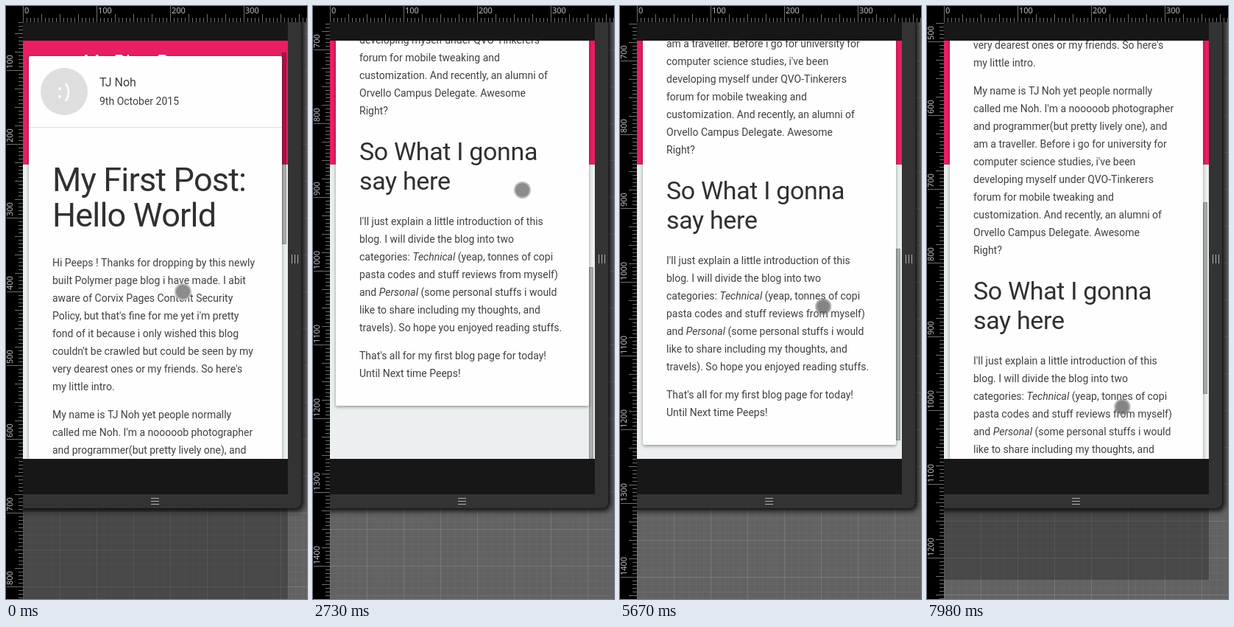
Write an HTML page with a canvas that moves like this. It is 409x804 px and loops after 8000 ms.

```html
<!DOCTYPE html>
<html lang="en">
<head>
<meta charset="utf-8">
<title>Scrolling blog in a device preview</title>
<style>
  html, body { margin: 0; width: 100%; height: 100%; overflow: hidden; background: #000; }
  canvas { display: block; width: 409px; height: 804px; }
</style>
</head>
<body>
<canvas id="stage" width="409" height="804"></canvas>
<script>
const W = 409, H = 804, LOOP = 8000, STEP = 70;
const RULER = 22, LEFT = 23, RIGHT = 383, TOP = 47, BOTTOM = 614;
const MAX_SCROLL = 662, THUMB = 260, GRAB = 3850;
const ctx = document.getElementById('stage').getContext('2d');

// Each gesture eases from wherever the last one ended.
const swipes = [
  { at: -400, dur: 800, to: 165 },
  { at: 1050, dur: 785, to: 420 },
  { at: 1960, dur: 500, to: MAX_SCROLL },
  { at: 3920, dur: 740, to: 514 },
  { at: 4760, dur: 600, to: MAX_SCROLL },
  { at: 5530, dur: 400, to: 474 },
  { at: 6440, dur: 764, to: MAX_SCROLL },
  { at: 7280, dur: 640, to: 473 }
];
const pointerMoves = [
  { at: 0, dur: 840, x: 245, y: 528 },
  { at: 1050, dur: 575, x: 262, y: 360 },
  { at: 1625, dur: 265, x: 248, y: 528 },
  { at: 1960, dur: 640, x: 284, y: 249 },
  { at: 2800, dur: 630, x: 267, y: 440 },
  { at: 3430, dur: 420, x: 276, y: 354 }
];

const smooth = p => p * p * (3 - 2 * p);
const clamp01 = p => Math.min(1, Math.max(0, p));

function follow(gestures, key, start, t) {
  return gestures.reduce(
    (v, g) => v + (g[key] - v) * smooth(clamp01((t - g.at) / g.dur)), start);
}

const scrollAt = t => Math.round(follow(swipes, 'to', -97, t));

function pointerAt(t, scroll) {
  if (t < GRAB) {
    return [follow(pointerMoves, 'x', 240, t), follow(pointerMoves, 'y', 387, t)];
  }
  const pull = MAX_SCROLL - scroll;
  return [280 - pull * 0.08, 354 + pull];
}

function box(x, y, w, h, color) {
  ctx.fillStyle = color;
  ctx.fillRect(x, y, w, h);
}

function disc(x, y, r, color) {
  ctx.fillStyle = color;
  ctx.beginPath();
  ctx.arc(x, y, r, 0, Math.PI * 2);
  ctx.fill();
}

// Text between asterisks is set in italics.
function text(str, x, y, size, color, spacing = 0) {
  ctx.fillStyle = color;
  ctx.letterSpacing = spacing + 'px';
  str.split('*').forEach((run, i) => {
    ctx.font = `${i % 2 ? 'italic ' : ''}${size}px Roboto, sans-serif`;
    ctx.fillText(run, x, y);
    x += ctx.measureText(run).width;
  });
  ctx.letterSpacing = '0px';
}

function heading(rows, y, size, leading, tracking) {
  rows.forEach((row, i) => text(row, 63, y + i * leading, size, '#303030', size * tracking));
}

function paragraph(rows, y) {
  rows.forEach((row, i) => text(row, 63, y + i * 24, 14, '#404040'));
}

const intro = [
  'Hi Peeps ! Thanks for dropping by this newly',
  'built Polymer page blog i have made. I abit',
  'aware of Corvix Pages Content Security',
  "Policy, but that's fine for me yet i'm pretty",
  'fond of it because i only wished this blog',
  "couldn't be crawled but could be seen by my",
  "very dearest ones or my friends. So here's",
  'my little intro.'
];
const about = [
  'My name is TJ Noh yet people normally',
  "called me Noh. I'm a nooooob photographer",
  'and programmer(but pretty lively one), and',
  'am a traveller. Before i go for university for',
  "computer science studies, i've been",
  'developing myself under QVO-Tinkerers',
  'forum for mobile tweaking and',
  'customization. And recently, an alumni of',
  'Orvello Campus Delegate. Awesome',
  'Right?'
];
const plan = [
  "I'll just explain a little introduction of this",
  'blog. I will divide the blog into two',
  'categories: *Technical* (yeap, tonnes of copi',
  'pasta codes and stuff reviews from myself)',
  'and *Personal* (some personal stuffs i would',
  'like to share including my thoughts, and',
  'travels). So hope you enjoyed reading stuffs.'
];
const outro = ["That's all for my first blog page for today!", 'Until Next time Peeps!'];

function drawBackdrop(scroll) {
  box(0, 0, W, H, '#626262');
  const originY = RULER - 1 - scroll;
  for (const [step, alpha] of [[10, 0.035], [50, 0.1]]) {
    const color = `rgba(255,255,255,${alpha})`;
    for (let x = LEFT; x < W; x += step) box(x, RULER, 1, H, color);
    for (let y = originY; y < H; y += step) if (y >= RULER) box(LEFT, y, W, 1, color);
  }
  box(LEFT, RULER, RIGHT - LEFT, Math.max(0, 1251 - scroll - RULER), 'rgba(0,0,0,.27)');
}

function drawDevice() {
  ctx.save();
  ctx.shadowColor = '#000';
  ctx.shadowBlur = 8;
  ctx.shadowOffsetX = ctx.shadowOffsetY = 3;
  ctx.fillStyle = '#333';
  ctx.beginPath();
  ctx.roundRect(0, 0, 401, 681, [0, 0, 8, 0]);
  ctx.fill();
  ctx.restore();
  box(LEFT, RULER, RIGHT - LEFT, 640, '#171717');
  for (let i = 0; i < 3; i++) {
    box(197, 667 + i * 4, 11, 1, '#b0b0b0');
    box(388 + i * 4, 337, 1, 12, '#b0b0b0');
  }
}

function drawAvatar(x, y) {
  disc(x, y, 32, '#dedede');
  disc(x - 6, y - 4, 2, '#fff');
  disc(x - 6, y + 7, 2, '#fff');
  ctx.strokeStyle = '#fff';
  ctx.lineWidth = 2.5;
  ctx.beginPath();
  ctx.arc(x - 14, y + 1, 20, -0.65, 0.65);
  ctx.stroke();
}

function drawCard() {
  ctx.save();
  ctx.shadowColor = 'rgba(0,0,0,.4)';
  ctx.shadowBlur = 4;
  ctx.shadowOffsetY = 1.5;
  ctx.fillStyle = '#fefefe';
  ctx.beginPath();
  ctx.roundRect(31, 102, 344, 1102, 2);
  ctx.fill();
  ctx.restore();

  drawAvatar(79, 150);
  text('TJ Noh', 127, 143, 16, '#404040');
  text('9th October 2015', 127, 168, 14, '#404040');
  box(31, 198, 344, 1, '#e0e0e0');
  heading(['My First Post:', 'Hello World'], 285, 45, 48, -0.018);
  paragraph(intro, 387);
  paragraph(about, 593);
  heading(['So What I gonna', 'say here'], 871, 34, 40, -0.01);
  paragraph(plan, 959);
  paragraph(outro, 1141);
}

function drawScrollbar(scroll, alpha) {
  const y = TOP + Math.round((BOTTOM - TOP - THUMB) * scroll / MAX_SCROLL);
  ctx.globalAlpha = alpha;
  box(375, y, 6, THUMB, 'rgba(0,0,0,.27)');
  ctx.strokeStyle = 'rgba(0,0,0,.16)';
  ctx.lineWidth = 1;
  ctx.strokeRect(375.5, y + 0.5, 5, THUMB - 1);
}

function drawPage(scroll, thumbAlpha) {
  ctx.save();
  ctx.beginPath();
  ctx.rect(LEFT, TOP, RIGHT - LEFT, BOTTOM - TOP);
  ctx.clip();
  box(LEFT, TOP, RIGHT - LEFT, BOTTOM - TOP, '#ebeff0');
  box(LEFT, TOP, RIGHT - LEFT, 168, '#e91e63');
  text('My Blog Page', 105, 85, 26, '#fff');
  ctx.translate(0, -scroll);
  drawCard();
  ctx.translate(0, scroll);
  drawScrollbar(scroll, thumbAlpha);
  ctx.restore();
}

function drawRulers(scroll) {
  box(0, 0, W, RULER, '#000');
  box(0, 0, LEFT, H, '#000');
  ctx.font = '11px "Open Sans", sans-serif';
  const tickLength = v => v % 100 === 0 ? RULER : v % 25 === 0 ? 11 : 6;
  const label = (v, x, y, angle) => {
    ctx.save();
    ctx.translate(x, y);
    ctx.rotate(angle);
    ctx.fillStyle = '#ccc';
    ctx.fillText(v, 2, 0);
    ctx.restore();
  };
  for (let v = 0; v + LEFT < W; v += 5) {
    const n = tickLength(v), x = LEFT + v;
    box(x, RULER - n, 1, n, '#707070');
    if (v % 100 === 0) label(v, x, 10, 0);
  }
  const originY = RULER - 1 - scroll;
  for (let v = Math.ceil((scroll + 1) / 5) * 5; v + originY < H + 25; v += 5) {
    const n = tickLength(v), y = v + originY;
    box(LEFT - n, y, n, 1, '#707070');
    if (v % 100 === 0) label(v, 9, y, -Math.PI / 2);
  }
}

function drawPointer(t, scroll) {
  const [x, y] = pointerAt(t, scroll).map(v => v + 0.5);
  const pressed = t >= GRAB || swipes.some(s => s.at > 0 && t > s.at && t < s.at + s.dur);
  if (pressed) {
    const g = ctx.createRadialGradient(x, y, 7, x, y, 11.5);
    g.addColorStop(0, 'rgba(85,85,85,.72)');
    g.addColorStop(0.5, 'rgba(100,100,100,.62)');
    g.addColorStop(1, 'rgba(150,150,150,.3)');
    disc(x, y, 11.5, g);
  } else {
    disc(x, y, 11.5, '#bdbdbd');
    disc(x, y, 9.5, '#8c8c8c');
  }
}

function draw(now) {
  const t = Math.floor((now % LOOP) / STEP) * STEP;
  const scroll = scrollAt(t);
  const lagging = scrollAt(Math.max(0, t - STEP));
  const thumbAlpha = t < 3990 ? 1 - clamp01((t - 2800) / 300) : 1;
  drawBackdrop(lagging);
  drawDevice();
  drawPage(scroll, thumbAlpha);
  drawRulers(lagging);
  drawPointer(t, scroll);
}

let start;
function tick(now) {
  start ??= now;
  draw(now - start);
  requestAnimationFrame(tick);
}
draw(0);
requestAnimationFrame(tick);
</script>
</body>
</html>
```
